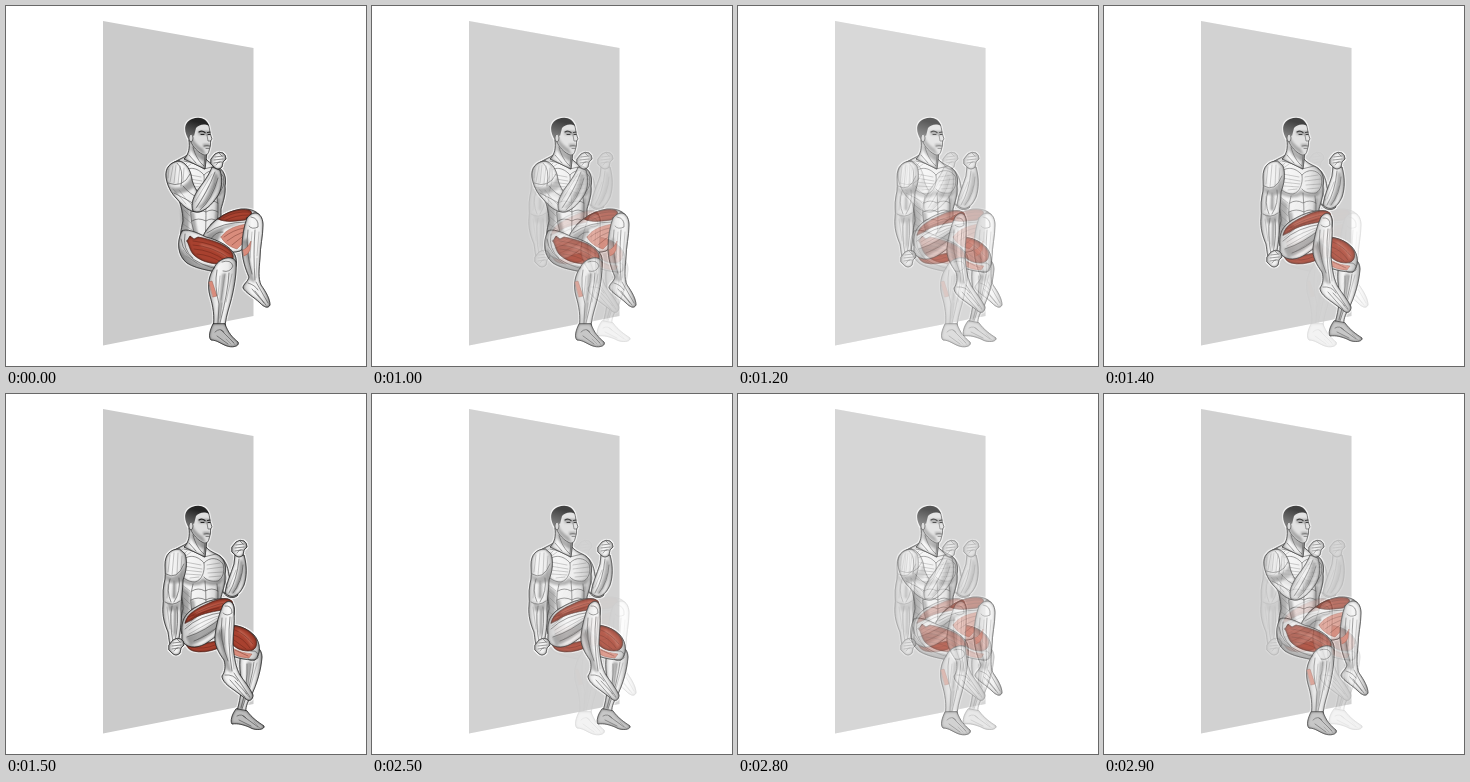
Write an HTML page without scripts that moves like this. It is 360 by 360 pixels and loops after 3000 ms.

```html
<!DOCTYPE html>
<html lang="en">
<head>
<meta charset="utf-8">
<title>Wall sit march</title>
<style>
html, body { margin: 0; width: 100%; height: 100%; overflow: hidden; background: #fff; }
svg { display: block; width: 100%; height: 100%; }
path { stroke-linecap: round; stroke-linejoin: round; }
.body { filter: url(#halo); }
.limb { fill: url(#skin); stroke: #2e2e2e; stroke-width: .7; filter: url(#round); }
.foot { fill: #bcbcbc; stroke: #2e2e2e; stroke-width: .7; filter: url(#round); }
.red { fill: #a8412f; stroke: #5c2219; stroke-width: .5; filter: url(#round); }
.pink { fill: #d98c7c; stroke: #96503f; stroke-width: .4; }
.line { fill: none; stroke: #3c3c3c; stroke-width: .7; opacity: .8; }
.fine { fill: none; stroke: #666; stroke-width: .45; opacity: .8; }
.grain { fill: none; stroke: #4f170f; stroke-width: .5; opacity: .7; }
.gleam { fill: none; stroke: #e29a88; stroke-width: 1.6; opacity: .6; filter: url(#soft); }
.shade { fill: #3a3a3a; opacity: .42; filter: url(#soft); }
/* Both poses share one stepped fade, half a loop apart. */
.pose { animation: fade 3s step-end infinite; }
.first { animation-delay: -1.5s; }
@keyframes fade {
  0% { opacity: 0; }
  33.333% { opacity: .167; }
  36.666% { opacity: .333; }
  40% { opacity: .5; }
  43.333% { opacity: .667; }
  46.666% { opacity: .833; }
  50% { opacity: 1; }
  83.333% { opacity: .833; }
  86.666% { opacity: .667; }
  90% { opacity: .5; }
  93.333% { opacity: .333; }
  96.666% { opacity: .167; }
  100% { opacity: 0; }
}
</style>
</head>
<body>
<svg viewBox="0 0 360 360">
<defs>
  <linearGradient id="skin">
    <stop offset="0" stop-color="#c4c4c4"/>
    <stop offset=".35" stop-color="#f6f6f6"/>
    <stop offset=".7" stop-color="#ececec"/>
    <stop offset="1" stop-color="#b4b4b4"/>
  </linearGradient>
  <linearGradient id="crop" x1=".6" y1="0" x2=".3" y2="1">
    <stop offset=".2" stop-color="#242424"/>
    <stop offset="1" stop-color="#777"/>
  </linearGradient>
  <filter id="round" x="-20%" y="-20%" width="140%" height="140%" color-interpolation-filters="sRGB">
    <feComponentTransfer in="SourceAlpha"><feFuncA type="table" tableValues="1 0"/></feComponentTransfer>
    <feGaussianBlur stdDeviation="1.6"/>
    <feComposite in2="SourceAlpha" operator="in"/>
    <feComponentTransfer result="rim"><feFuncA type="linear" slope=".75"/></feComponentTransfer>
    <feMerge><feMergeNode in="SourceGraphic"/><feMergeNode in="rim"/></feMerge>
  </filter>
  <filter id="halo" color-interpolation-filters="sRGB">
    <feMorphology in="SourceAlpha" operator="dilate" radius=".7"/>
    <feColorMatrix values="0 0 0 0 1 0 0 0 0 1 0 0 0 0 1 0 0 0 .7 0" result="edge"/>
    <feMerge><feMergeNode in="edge"/><feMergeNode in="SourceGraphic"/></feMerge>
  </filter>
  <filter id="soft" x="-40%" y="-40%" width="180%" height="180%"><feGaussianBlur stdDeviation="1.1"/></filter>

  <path id="wall" d="M97 15L247.500 42V310L97 339.500Z" fill="#cbcbcb"/>

  <g id="head">
    <path class="limb" d="M183 134C184 142 183 148 178 153L199 163C200 156 200 151 201 147Z"/>
    <path class="line" d="M187 141C189 149 193 156 198 160M183 149L190 157M199 150L198 160"/>
    <path class="shade" d="M185 137Q192 147 200 149L199 155Q190 153 185 144Z"/>
    <path d="M183 122C184 116 190 113 196 114C201 115 203 119 203.500 123L204 127L206 133L204.500 135L204.500 139L203 145C202 149 199 150 196 148C192 146 187 141 185 136Z" fill="#dedede" stroke="#303030" stroke-width=".7"/>
    <path class="shade" d="M185 128Q188 138 197 143L200 149Q191 146 185 136Z"/>
    <path class="shade" d="M192 125H204V129H193ZM197 138H204V141H197Z"/>
    <path d="M183 134C177 125 178 116 186 113C193 110 201 112 203 120C198 117 193 119 190 122L188 130L185 128Z" fill="url(#crop)"/>
    <ellipse cx="185" cy="132" rx="2" ry="3.700" fill="#d4d4d4" stroke="#333" stroke-width=".7"/>
    <path d="M193 126Q196 124 199 126.500M201.500 126.500L204 126" fill="none" stroke="#222" stroke-width="1.200"/>
    <path d="M195 128.500H198M202 128.500H204" stroke="#222"/>
    <path class="line" d="M201 129L202 135H205M198 140Q201 139 204 140M200 142.500H203"/>
  </g>

  <g id="torso">
    <path class="limb" d="M183 148C178 152 168 155 163 160L170 186C174 196 177 205 177 215C175 224 173 232 176 240L214 238C215 226 215 212 215 203C217 196 220 188 219 180C221 172 218 163 210 160C206 158 202 156 200 153Z"/>
    <path class="shade" d="M175 182Q188 192 197 184Q207 191 218 183L214 190Q205 193 198 189Q187 195 175 187Z"/>
    <path class="shade" d="M174 190L184 198L183 225L176 236Z"/>
    <path class="shade" d="M184 206L188 206 191 224 196 236 187 230ZM211 192L214 192 212 220 207 232Z"/>
    <path class="line" d="M177 166C184 159 193 163 198 169C199 178 196 186 189 188C181 188 175 183 174 177M198 169C204 162 213 164 217 170C219 177 217 184 212 187C205 188 200 186 198 183"/>
    <path class="line" d="M178 155Q190 157 198 163L210 160M199 187Q201 208 199 235M187 190Q182 207 188 226L196 236M211 190Q214 208 209 226L202 236"/>
    <path class="line" d="M186 197Q192 193 199 197Q206 193 212 197M185 206Q192 202 200 206Q206 202 212 206M186 215Q192 211 200 215Q206 211 211 215"/>
    <path class="fine" d="M179 168L195 171M178 172L196 175M178 176L196 178M180 180L195 181M184 184L193 183M201 171L214 169M201 175L217 173M202 179L217 178M203 183L215 182"/>
    <path class="fine" d="M175 190L184 197M177 197L184 203M178 204L184 210M178 211L185 217M177 218L186 224M176 225L190 235M177 155L169 160M181 157L173 165M185 158L177 164"/>
  </g>

  <g id="fist">
    <path class="limb" d="M1 7L5 2Q9 -1 13 1Q16 3 16 7L13 10L12 15Q8 19 4 15L1 12Z"/>
    <path class="line" d="M5 5L13 4M4 8L13 7M4 11L10 10M9 1L12 4M6 13Q8 9 12 10"/>
  </g>
</defs>

<g class="pose first">
  <use href="#wall"/>
  <g class="body">
    <use href="#torso"/>
    <use href="#head"/>

    <!-- raised far leg -->
    <path class="limb" d="M196 232C203 216 218 206 235 203C248 202 256 208 256 217C254 228 244 238 234 245C224 248 208 246 200 240Z"/>
    <path class="red" d="M212 213C220 206 233 202 243 204C248 206 245 211 239 214C230 215 220 217 212 213Z"/>
    <path class="pink" d="M215 231C221 222 233 219 241 218L238 236L231 243C224 241 218 237 215 231Z"/>
    <path class="grain" d="M217 212Q229 205 243 206M220 214Q230 209 242 209M218 231Q227 224 238 222M221 235Q229 229 237 226M226 239L236 231"/>
    <path class="shade" d="M200 230Q212 219 238 216L218 223 209 240Z"/>
    <path class="line" d="M201 227Q216 216 241 216M204 234Q210 225 217 226M204 219Q211 212 215 211"/>
    <path class="limb" d="M241 212C249 202 257 208 257 219C257 230 254 241 254 252C253 264 252 272 255 279C260 286 264 293 264 299C262 303 258 301 254 297C248 291 240 287 237 282C237 278 242 276 243 271C239 262 236 252 236 242C236 231 238 220 241 212Z"/>
    <path class="shade" d="M237 235L242 232 244 255 249 277 244 274Z"/>
    <path class="line" d="M245 211Q253 212 252 221Q246 224 243 220M249 224Q247 248 249 274M242 224Q239 244 246 268M242 277Q249 279 252 284M250 276L262 297M246 283L258 297M249 285L260 299"/>
    <path class="fine" d="M253 226L251 250M246 226L244 252M251 252L250 272M241 236L244 258"/>
    <path class="pink" d="M237 244Q242 242 245 235L244 244Q242 249 238 250Z"/>

    <!-- standing near leg -->
    <path class="limb" d="M176 225C180 222 190 226 200 231C212 234 224 240 229 249C232 257 230 264 225 268C212 266 192 264 181 257C172 250 170 236 176 225Z"/>
    <path class="shade" d="M172 238Q178 251 194 257L222 264 212 266Q184 263 176 252Z"/>
    <path class="red" d="M181 235L184 230L188 233L192 231C203 233 217 237 224 244C229 249 228 256 222 258C211 259 197 257 189 250C184 246 184 241 181 235Z"/>
    <path class="gleam" d="M195 239Q212 242 222 252"/>
    <path class="grain" d="M187 235Q208 237 224 248M187 239Q206 240 223 252M188 243Q205 244 220 255M191 248Q204 249 215 256"/>
    <path class="line" d="M175 233Q177 250 196 258T219 262M179 228Q176 243 187 252"/>
    <path class="fine" d="M177 244Q183 253 194 259M180 250L191 257M199 259L214 262"/>
    <path class="limb" d="M208 262C212 252 227 248 230 256C231 266 228 284 224 298C221 308 219 315 219 323L207 323C209 310 207 300 204 290C201 279 203 269 208 262Z"/>
    <path class="shade" d="M216 268L220 267 216 300 213 320 210 320 213 298Z"/>
    <path class="foot" d="M207 318C204 324 202 331 205 334C211 334 215 338 221 340C227 342 234 340 232 336C227 332 222 327 219 318Z"/>
    <path class="pink" d="M203 276L206 275 211 290 207 291Z"/>
    <path class="line" d="M216 256Q225 253 227 260Q224 267 217 265M223 267Q222 286 214 317M211 264Q208 280 213 298L212 317M209 326Q214 321 218 326M215 324L228 337M211 330L222 338"/>
    <path class="fine" d="M226 268L220 296M219 268L215 294M214 270L212 289M216 297L214 312M225 334L229 339M220 333L225 338"/>

    <!-- raised near arm -->
    <path class="limb" d="M173 155C164 156 159 162 160 171C161 179 165 187 171 193C177 200 183 206 192 206C198 206 201 201 199 196C193 188 188 182 186 174C185 164 180 156 173 155Z"/>
    <path class="shade" d="M164 181Q176 185 185 172L188 181Q180 188 169 188Z"/>
    <path class="line" d="M162 177Q177 183 184 168M168 187Q178 192 192 200M177 180Q183 188 196 194M171 157Q178 162 175 180"/>
    <path class="fine" d="M167 160L164 176M170 159L168 177M174 160L172 178M178 162L177 176M173 184Q179 193 188 201M167 183L180 198M163 163L162 172"/>
    <path class="limb" d="M187 205C184 198 188 189 194 181C200 173 204 167 206 161L214 164C217 174 216 184 211 191C206 198 199 206 191 206Z"/>
    <path class="shade" d="M192 202Q203 190 209 166L212 170Q211 189 196 203Z"/>
    <path class="line" d="M190 202Q201 187 209 166M194 204Q206 194 212 172"/>
    <path class="fine" d="M189 196Q198 181 206 168M197 199Q205 190 209 177M191 201L203 180"/>
    <use href="#fist" x="204" y="146"/>
  </g>
</g>

<g class="pose">
  <use href="#wall"/>
  <g class="body">
    <!-- far arm -->
    <path class="limb" d="M211 161C218 163 222 172 223 181C225 190 229 196 232 201C227 206 220 203 217 198C214 190 212 180 211 161Z"/>
    <path class="limb" d="M219 199C220 190 225 180 228 170L229 161L238 161C241 172 241 182 238 191C234 200 227 207 219 199Z"/>
    <path class="shade" d="M224 199Q233 186 234 165L237 168Q238 187 228 201Z"/>
    <path class="line" d="M215 169Q218 182 221 194M223 199Q231 186 233 165M227 199Q236 188 237 171"/>
    <path class="fine" d="M218 173L221 186M223 193L230 176M230 195L235 180"/>
    <use href="#fist" x="225" y="146"/>

    <use href="#torso"/>
    <use href="#head"/>

    <!-- standing far leg -->
    <path class="limb" d="M238 252C248 248 256 254 256 263C255 276 251 290 245 302C241 309 239 314 240 320L230 320C234 308 236 296 235 284C233 272 233 260 238 252Z"/>
    <path class="shade" d="M241 268L246 268 242 296 236 316 233 316 240 293Z"/>
    <path class="foot" d="M230 315C226 320 224 327 226 330C232 329 238 331 243 333C249 337 259 336 258 332C252 328 246 324 241 317Z"/>
    <path class="limb" d="M213 232C222 229 238 231 248 241C255 249 255 260 249 266C240 266 226 264 214 256Z"/>
    <path class="red" d="M226 232C236 231 246 238 250 245C252 252 249 257 242 257C235 257 229 254 225 249Z"/>
    <path class="pink" d="M226 254Q235 259 246 260L243 264Q233 264 225 259Z"/>
    <path class="gleam" d="M233 237Q243 243 246 251"/>
    <path class="grain" d="M229 236Q239 240 247 250M228 241Q237 244 244 254M228 246L240 255M229 256L242 262"/>
    <path class="line" d="M245 257Q253 256 252 264Q246 269 242 265M248 268Q246 287 236 315M241 270Q242 290 235 314M231 322Q236 319 240 324M237 322L252 333M233 326L245 332"/>
    <path class="fine" d="M251 269L243 298M245 270L241 296M239 300L235 313M248 328L254 334"/>

    <!-- raised near leg -->
    <path class="red" d="M179 248Q190 252 210 247L213 254Q198 260 187 257Q181 255 179 248Z"/>
    <path class="limb" d="M176 240C175 230 177 223 184 217C195 209 210 203 222 205C228 208 229 214 228 221C222 233 210 243 199 250C190 255 179 254 176 246Z"/>
    <path class="shade" d="M180 243Q200 236 219 220L214 233Q199 247 184 252Z"/>
    <path class="red" d="M179 229C181 219 192 214 203 209C211 205 221 203 226 207C228 211 223 215 216 216C205 218 193 220 186 226Z"/>
    <path class="gleam" d="M190 219Q205 211 219 209"/>
    <path class="grain" d="M183 223Q201 212 223 208M186 222Q203 215 221 211M183 226Q196 217 213 214M185 253Q198 256 209 251"/>
    <path class="line" d="M179 235Q193 221 219 218M181 243Q200 237 216 223M188 247Q202 242 214 231"/>
    <path class="fine" d="M183 236Q199 225 216 221M183 240Q199 231 215 222M180 232L190 224M192 245L210 234"/>
    <path class="limb" d="M217 211C224 203 229 209 228 219C229 228 227 240 227 250C228 264 230 274 234 281C238 287 244 294 247 301C247 306 243 308 240 305L228 296C222 292 216 287 216 282C219 278 220 272 218 266C213 259 208 251 209 242C210 231 213 220 217 211Z"/>
    <path class="shade" d="M211 240L217 232 220 255 226 279 221 276Z"/>
    <path class="line" d="M219 212Q226 211 226 219Q221 223 217 219M224 223Q221 247 226 277M216 224Q213 245 222 267M219 281Q228 280 232 287M228 279L244 303M224 286L239 303M229 287L241 300"/>
    <path class="fine" d="M226 223L224 250M220 224L218 251M225 251L228 275M213 236L219 257M239 299L244 304"/>

    <!-- hanging near arm -->
    <path class="limb" d="M173 155C164 155 159 161 159 171C159 178 160 183 158 190C156 199 158 206 157 212C156 222 159 231 162 238C163 244 163 247 164 250L172 249C174 240 176 228 175 215C175 205 177 195 177 186C180 178 182 168 179 160Z"/>
    <path class="shade" d="M160 181Q170 187 178 172L177 187Q169 191 162 188ZM161 207Q168 214 174 206L173 216 163 217Z"/>
    <path class="shade" d="M167 189L170 188 170 204 166 204ZM168 216L171 216 170 240 167 244Z"/>
    <path class="line" d="M160 180Q171 187 178 170M164 185Q160 197 165 208M173 184Q175 197 168 208M159 208Q166 213 174 207M166 212Q163 229 167 248M171 213Q173 229 169 247"/>
    <path class="fine" d="M164 161L162 178M168 159L166 181M172 159L171 180M176 162L175 174M168 187L168 204M162 190L161 204M161 213L164 235M169 215L169 239M164 213L166 238"/>
    <use href="#fist" x="162" y="244"/>
  </g>
</g>
</svg>
</body>
</html>
```
